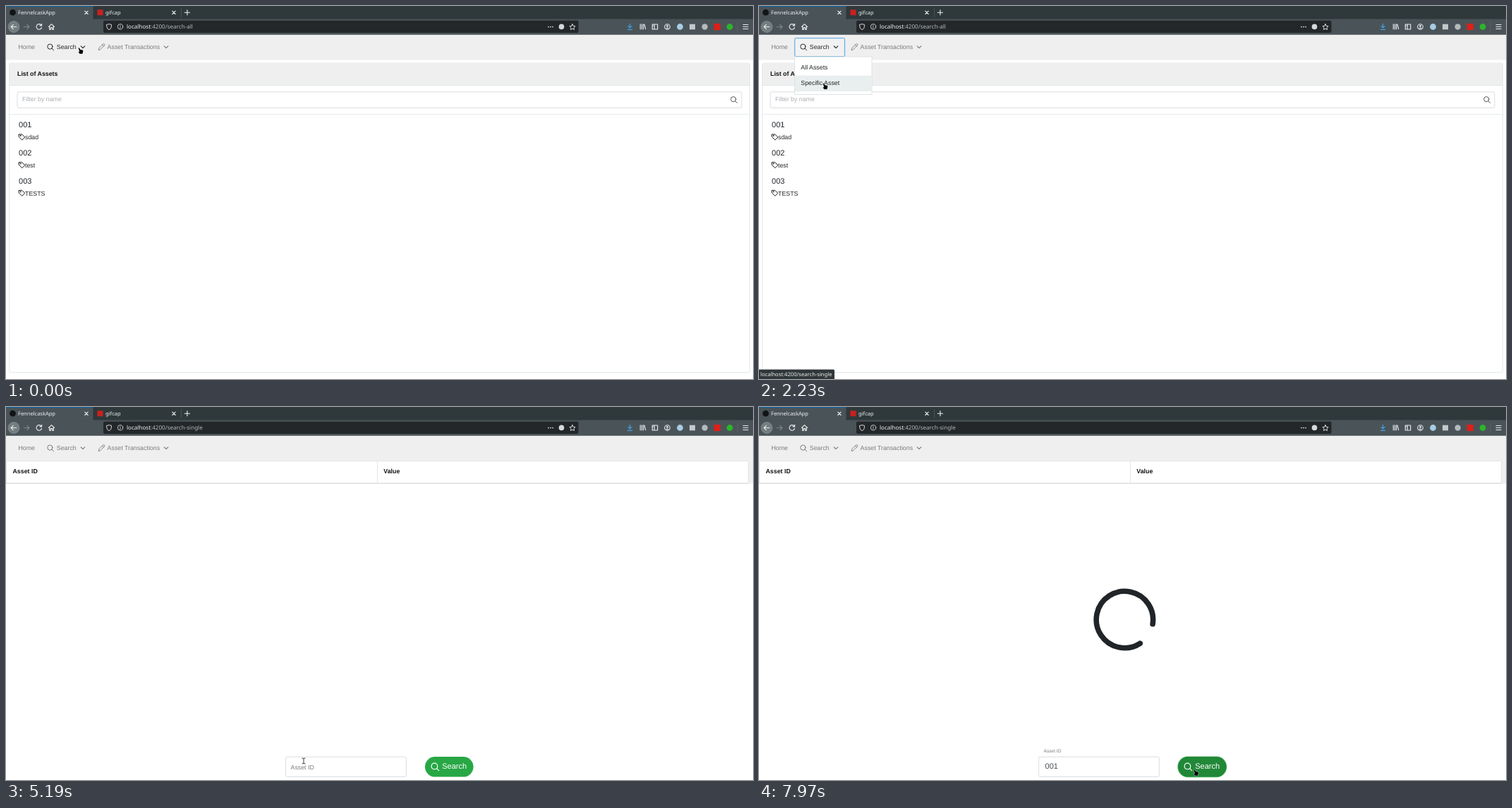
Recreate the animation shown at these times as an HTML page. Size 1059 by 529 pixels, loop 8000 ms.

```html
<!DOCTYPE html>
<html lang="en">
<head>
<meta charset="utf-8">
<title>Asset search</title>
<style>
  html, body { margin: 0; width: 100%; height: 100%; overflow: hidden; background: #fff; }
  svg { display: block; }
  text { font: 8.825px "Liberation Sans", Arial, sans-serif; fill: #212529; text-rendering: geometricPrecision; white-space: pre; }
  .ui { font-family: "Noto Sans", sans-serif; font-size: 7.5px; fill: #eef0f0; }
  .url { font-size: 8.07px; fill: #b4b9bb; }
  .big { font-size: 11.03px; }
  .bold { font-weight: bold; fill: #111; }
  .grey { fill: #7b7b7b; }
  .line { fill: none; stroke: currentColor; stroke-linecap: round; stroke-linejoin: round; }
  .box { fill: #fff; stroke: #ced4da; stroke-width: .8; }
</style>
</head>
<body>
<svg width="1059" height="529" viewBox="0 0 1059 529">
  <defs>
    <g id="lens" class="line"><circle cx="-.8" cy="-.8" r="3.6"/><path d="M1.9 1.9 4.4 4.4"/></g>
    <path id="chevron" class="line" d="M-2.8-1.3 0 1.5 2.8-1.3" stroke-width="1.2"/>
    <path id="cross" class="line" d="M-2.2-2.2 2.2 2.2M2.2-2.2-2.2 2.2" stroke-width="1.1"/>
    <g id="tag" class="line" stroke-width=".9"><path d="M-4-3.8H.2L4.3.3.3 4.2-4 0Z"/><circle cx="-2" cy="-1.9" r=".5"/></g>
  </defs>

  <!-- browser tabs -->
  <rect width="1059" height="19" fill="#2f393b"/>
  <rect width="123.5" height="19" fill="#4a5458"/>
  <rect width="123.5" height="1.1" fill="#0b629f"/>
  <circle cx="9.5" cy="9.2" r="4.4" fill="#121415"/>
  <text class="ui" x="17" y="12">FennelcaskApp</text>
  <rect x="129.5" y="5.2" width="8" height="8" fill="#c9211e"/>
  <text class="ui" x="141" y="12">gifcap</text>
  <g color="#eef0f0">
    <use href="#cross" x="114" y="9.3"/><use href="#cross" x="238" y="9.3"/>
    <path class="line" d="M253.3 9.2h7.2M256.9 5.6v7.2" stroke-width="1.1"/>
  </g>
  <path d="M248.5 3v13" stroke="#596366" stroke-width=".6"/>

  <!-- browser toolbar -->
  <rect y="18.5" width="1059" height="22.3" fill="#4a5458"/>
  <path d="M0 40.6h1059" stroke="#343d40" stroke-width=".6"/>
  <rect x="138" y="20.7" width="673.5" height="17.2" rx="1.8" fill="#232729"/>
  <circle cx="11" cy="29.5" r="8" fill="#747d80" stroke="#8e9699" stroke-width=".6"/>
  <g class="line" color="#e8ebeb" stroke-width="1.15">
    <path d="M14.8 29.5H7.3m3-3.2-3.1 3.2 3.1 3.2"/>
    <path d="M25.3 29.5h7.5m-3-3.2 3.1 3.2-3.1 3.2" stroke="#7e878a"/>
    <path d="M50 27.3a3.8 3.8 0 1 0 .5 3.2M50.6 25.2v2.6H48"/>
    <path d="M60.5 29.5 64.5 25.6 68.5 29.5M61.7 29.3v4H63.3v-2.6h2.4v2.6h1.6v-4"/>
    <path d="M142.8 26.3q3.3-1.4 6.6 0v3q0 3-3.3 4.4-3.3-1.4-3.3-4.4Z" stroke-width=".9"/>
    <g stroke-width=".8"><circle cx="162" cy="29.3" r="3.7"/><path d="M162 28.8v2.2M162 27.3v.1"/></g>
    <path d="M803 25.6l1.2 2.6 2.9.4-2.1 2 .5 2.9-2.5-1.4-2.5 1.4.5-2.9-2.1-2 2.9-.4Z" stroke-width=".9"/>
    <path d="M769 29.5h.1M772 29.5h.1M775 29.5h.1" stroke-width="1.7"/>
    <path d="M884.5 25.2v5.6m-2.6-2.5 2.6 2.6 2.6-2.6M881.4 33.3h6.2" stroke="#45a1e8"/>
    <path d="M899.3 25.8v7M901.5 25.8v7M903.6 25.8v7M905 26l1.7 6.7"/>
    <path d="M916.3 26h7.4v7h-7.4ZM919.2 26v7M917.5 28h.4"/>
    <circle cx="937.5" cy="29.5" r="3.8"/>
    <path d="M1045 26.5h7M1045 29.5h7M1045 32.5h7"/>
  </g>
  <circle cx="937.5" cy="28.4" r="1.4" fill="#e8ebeb"/>
  <path d="M935 32q2.5-3 5 0Z" fill="#e8ebeb"/>
  <circle cx="787.5" cy="29.4" r="3.8" fill="#d5d9da"/>
  <circle cx="955.5" cy="29.5" r="4.4" fill="#a9cbe4"/>
  <rect x="969" y="25.7" width="8" height="7.6" fill="#c4c9ca"/>
  <circle cx="990.6" cy="29.5" r="4.2" fill="#b4babb"/>
  <rect x="1003.6" y="24.9" width="9.2" height="9.2" fill="#dd1f1b"/>
  <circle cx="1026" cy="29.5" r="4.4" fill="#2cb52c"/>
  <path d="M1037 22v15" stroke="#5e686b" stroke-width=".6"/>
  <text class="ui url" x="171" y="32.2"><tspan fill="#f4f5f5">localhost</tspan>:4200/<tspan id="path"></tspan></text>

  <!-- list page -->
  <rect y="40.8" width="1059" height="35.7" fill="#efefef"/>
  <g id="listPage">
    <rect class="box" x="4.5" y="81" width="1050" height="438.5" rx="1.5" style="stroke:#dee2e6"/>
    <rect x="4.9" y="81.3" width="1049.2" height="31.2" fill="#efefef"/>
    <path d="M4.5 112.5h1050M4.5 153.6h1050" stroke="#dee2e6" stroke-width=".8"/>
    <text class="bold" x="16" y="98.8">List of Assets</text>
    <rect class="box" x="16" y="121.8" width="1026.8" height="22.6" rx="2"/>
    <text x="23" y="135.4" style="fill:#a9adb1">Filter by name</text>
    <use href="#lens" x="1032" y="133" color="#555"/>
    <g id="rows"></g>
  </g>

  <!-- single search page -->
  <g id="singlePage">
    <rect y="76.5" width="1059" height="32" fill="#efefef"/>
    <rect class="box" x=".4" y="76.7" width="1051.8" height="31.5" style="stroke:#dee2e6"/>
    <path d="M526.5 77v31" stroke="#dee2e6" stroke-width=".8"/>
    <path d="M0 108.2h1052.5" stroke="#d3d7da" stroke-width=".9"/>
    <text class="bold" x="9.5" y="94.4">Asset ID</text>
    <text class="bold" x="535.3" y="94.4">Value</text>
    <rect class="box" x="396.6" y="496.2" width="170.8" height="28.2" rx="2"/>
    <g id="fieldFocus" fill="none">
      <rect x="396.3" y="495.9" width="171.4" height="28.8" rx="2.3" stroke="#b5daf6" stroke-width="2.4"/>
      <rect x="396.6" y="496.2" width="170.8" height="28.2" rx="2" stroke="#2e92dc" stroke-width="1.1"/>
    </g>
    <text id="label" class="grey" x="403.5">Asset ID</text>
    <text id="typed" class="big" x="405.5" y="513.3" style="fill:#495057"></text>
    <rect id="buttonRing" x="593.2" y="495.2" width="70.2" height="30.2" rx="15" fill="#93d3a2"/>
    <rect class="button" x="594" y="496" width="68.6" height="28.6" fill="#28a745"/>
    <rect class="button" id="buttonHover" x="594" y="496" width="68.6" height="28.6" fill="#218838"/>
    <use href="#lens" transform="translate(608.4 510.4) scale(1.2)" color="#fff"/>
    <text class="big" x="618.2" y="513.2" style="fill:#fff">Search</text>
    <circle id="spinner" r="40.2" fill="none" stroke="#212529" stroke-width="7.6" stroke-linecap="round" pathLength="360" stroke-dasharray="312 48"/>
  </g>

  <!-- navigation -->
  <g id="openButton" fill="#f2f2f2">
    <rect x="50.8" y="45.7" width="70.6" height="25.8" rx="2" stroke="#b9d9f1" stroke-width="2"/>
    <rect x="50.8" y="45.7" width="70.6" height="25.8" rx="2" stroke="#58a9e2" stroke-width="1"/>
  </g>
  <text class="grey" x="17.5" y="60.9">Home</text>
  <g id="searchNav">
    <use href="#lens" x="63.2" y="58.4"/><use href="#chevron" x="109" y="58.2"/>
    <text x="71.8" y="60.9" style="fill:currentColor">Search</text>
  </g>
  <g color="#7b7b7b">
    <path class="line" d="M131.3 62.3l.7-2.9 5.6-5.6q1.1-.6 1.9.3.7.9 0 1.8l-5.5 5.6ZM136.5 55l2 2" stroke-width=".9"/>
    <text class="grey" x="143.6" y="60.9">Asset Transactions</text>
    <use href="#chevron" x="227" y="58.2"/>
  </g>
  <g id="menu">
    <rect x="50.6" y="72" width="109.4" height="53.4" fill="#fff" stroke="#d9dcde" stroke-width=".8"/>
    <rect id="menuHover" x="51" width="108.7" height="22.4" fill="#e9eeee"/>
    <text x="59.3" y="89.9">All Assets</text>
    <text x="59.3" y="112">Specific Asset</text>
  </g>
  <g id="status">
    <path d="M0 515.5H105.5q1.5 0 1.5 1.5V529H0Z" fill="#2f373a"/>
    <text class="ui" x="2" y="525" style="font-size:7.6px">localhost:4200/search-single</text>
  </g>

  <!-- pointers, each with its hot spot at 0,0 -->
  <g id="cursor">
    <path id="hand" d="M-1.8.7Q-1.2-.6-.2.4L1.2 2.7 4 3.2Q5.6 3.6 5.1 5.6L4.3 9H.3L-1.8 6.6Q-1.8 5.4-.3 5.8Z" fill="#000" stroke="#fff" stroke-width=".4"/>
    <path id="arrow" d="M0 0V7.6L1.7 6.1 2.9 9 4.2 8.4 3 5.7H5.4Z" fill="#111" stroke="#fff" stroke-width=".4"/>
    <path id="beam" class="line" d="M-2-4Q0-4 0-3 0-4 2-4M0-3V3M-2 4Q0 4 0 3 0 4 2 4" color="#222" stroke-width=".9"/>
  </g>
</svg>
<script>
const LOOP = 8000, OPEN = 800, PAGE = 2510, FOCUS = 5280, PRESS = 7490, RELEASE = 7590, TICK = 95;
const $ = id => document.getElementById(id);
const show = (id, on) => $(id).style.display = on ? '' : 'none';
const fade = (id, v) => $(id).style.opacity = v;
const ramp = (t, start, length) => Math.min(1, Math.max(0, (t - start) / length));
const ease = p => p * p * (3 - 2 * p);

// pointer moves: first step, last step, step count, end point
const moves = [
  [200, 200, 1, 106, 59], [390, 480, 2, 98.5, 59.3],
  [1390, 1580, 3, 97, 78], [1660, 2040, 5, 92.3, 109.3],
  [3760, 4250, 6, 385, 374], [4550, 5090, 7, 422, 502],
  [6720, 7110, 5, 560, 519], [7200, 7400, 3, 618, 514]
];

function pointer(t) {
  let x = 104.3, y = 59;
  for (const [start, end, n, toX, toY] of moves) {
    if (t < start) break;
    const step = n > 1 ? Math.floor((t - start) / (end - start) * (n - 1) + 1e-6) + 1 : 1;
    const p = Math.min(1, step / n);
    x += (toX - x) * p;
    y += (toY - y) * p;
  }
  return [x, y];
}

$('rows').innerHTML = ['sdad', 'test', 'TESTS'].map((name, i) =>
  `<g transform="translate(0 ${i * 39.7})"><text class="big" x="18" y="172.4">00${i + 1}</text>
  <use href="#tag" x="22.5" y="185.8"/><text x="27" y="189.2">${name}</text></g>`).join('');

function draw(t) {
  const [x, y] = pointer(t);
  const single = t >= PAGE, open = t >= OPEN && !single;

  show('listPage', !single);
  show('singlePage', single);
  $('path').textContent = single ? 'search-single' : 'search-all';
  $('searchNav').style.color = single ? '#7b7b7b' : '#25282b';
  show('openButton', open);
  show('menu', open);
  fade('menu', ramp(t, OPEN - 50, 200));
  show('menuHover', y > 76);
  $('menuHover').setAttribute('y', y < 98.5 ? 76.3 : 98.6);
  show('status', t >= 2230 && !single);

  const lift = ease(ramp(t, FOCUS, 250));
  $('label').setAttribute('y', 513.6 - 23.2 * lift);
  $('label').style.fontSize = 8.825 - 2.205 * lift + 'px';
  fade('fieldFocus', ramp(t, FOCUS - 40, 150) - ramp(t, PRESS + 20, 150));
  $('typed').textContent = '001'.slice(0, [6070, 6260, 6460].filter(at => t >= at).length);

  const pressed = t >= PRESS && t < RELEASE;
  for (const b of document.querySelectorAll('.button')) b.setAttribute('rx', pressed ? 0 : 14.3);
  fade('buttonHover', ramp(t, 7270, 150));
  fade('buttonRing', pressed ? 0 : ramp(t, RELEASE - 60, 150));
  show('spinner', t >= RELEASE);
  const turn = Math.floor((t - RELEASE) / TICK) * TICK * .18 - 11.4;
  $('spinner').setAttribute('transform', `translate(518.4 301.5) rotate(${turn})`);

  const inField = x > 396 && x < 568 && y > 496;
  const link = !single || x > 594;
  show('hand', link);
  show('beam', inField);
  show('arrow', !link && !inField);
  $('cursor').setAttribute('transform', `translate(${x} ${y})`);
}

const begin = performance.now();
function tick() {
  draw((performance.now() - begin) % LOOP);
  requestAnimationFrame(tick);
}
tick();
</script>
</body>
</html>
```
